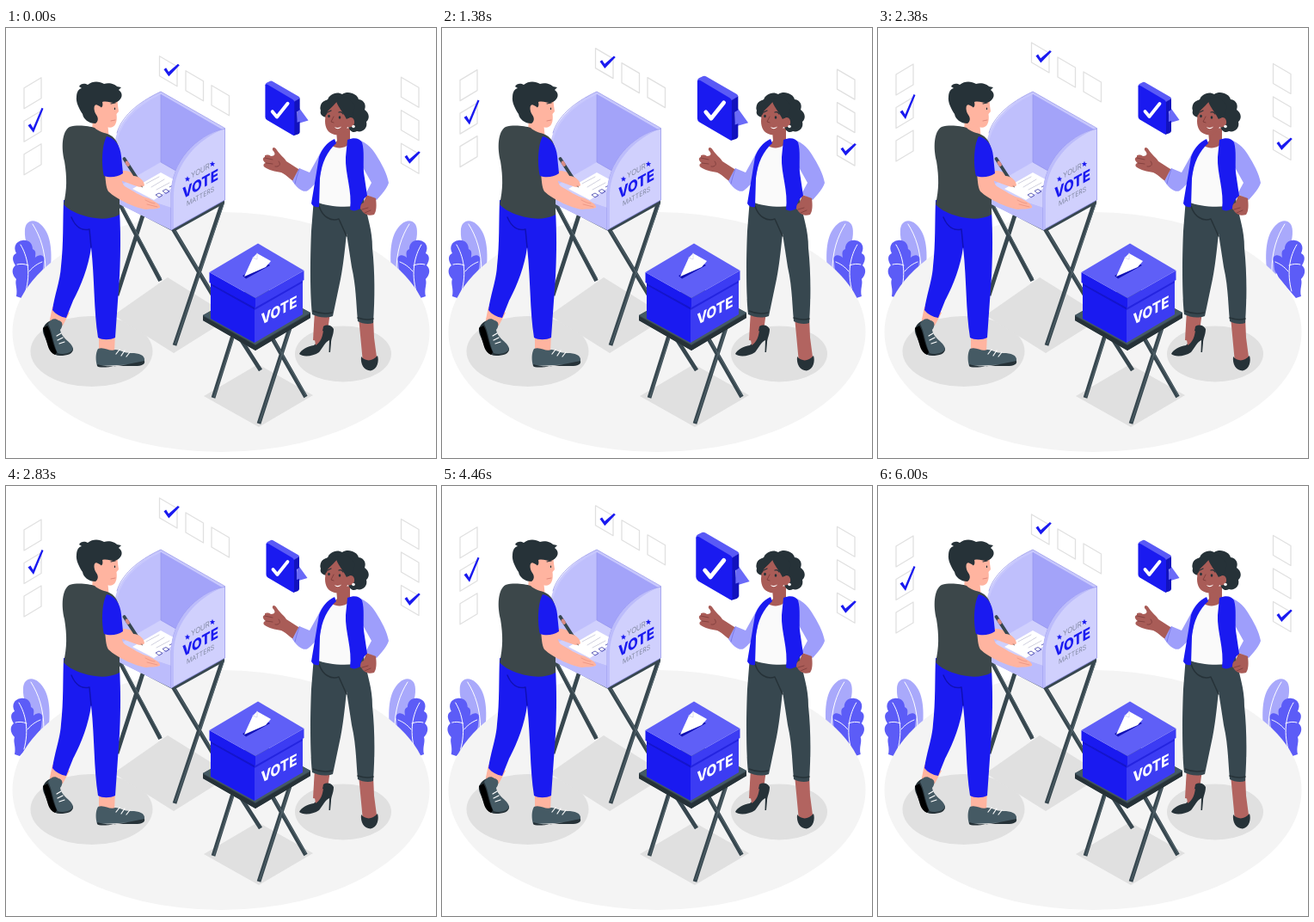
An HTML page that plays this animation: 500 by 500 pixels, repeating every 6040 ms.

```html
<!DOCTYPE html>
<html lang="en">
<head>
<meta charset="utf-8">
<title>Vote</title>
<style>
html, body { margin: 0; width: 100%; height: 100%; overflow: hidden; background: #fff; }
svg { display: block; width: 100vw; height: 100vh; }
text { font-family: Inter, "Open Sans", sans-serif; text-anchor: middle; }
.line { fill: none; stroke-linecap: round; stroke-linejoin: round; }
.blue { fill: #1a1af0; }
.slate { fill: #37474f; }
.ink { fill: #263238; }
.skin { fill: #ffb4a0; }
.tan { fill: #a95c57; }
.shin { fill: #b26460; }
.lilac { fill: #9e9efb; }
.box { fill: none; stroke: #e0e0e0; stroke-width: 1.3; stroke-linejoin: round; }
.tick { fill: #1a1af0; }
.leg { stroke: #37474f; stroke-width: 4.8; fill: none; }
.shine { stroke: #55666e; stroke-width: 1; fill: none; }
</style>
</head>
<body>
<svg viewBox="0 0 500 500">
<defs>
  <g id="plant">
    <path fill="#a9a9fb" d="M42 290C38 268 21 258 22 236C22 224 32 221 40 228C52 238 54 258 52 280Z"/>
    <path class="line" stroke="#fff" d="M31 228C40 242 46 260 46 282"/>
    <path fill="#5c5cf7" d="M12 312C14 303 10 298 12 292C7 287 6 280 11 276C7 270 7 264 12 262C8 254 12 248 19 247C26 246 31 250 31 257C36 259 34 264 34 267C39 262 46 264 44 271C43 277 44 282 40 286C38 292 34 296 30 300L18 314Z"/>
    <path class="line" stroke="#fff" d="M17 252C25 265 29 284 23 306M26 276C21 274 17 274 13 275M27 283C32 277 37 274 42 272"/>
  </g>
  <path id="star" d="M0-3.2L.9-1L3.2-.8L1.4.7L2 3L0 1.8L-2 3L-1.4.7L-3.2-.8L-.9-1Z"/>
  <path id="squareUp" class="box" d="M21 70L41 58V82L21 94Z"/>
  <path id="squareDown" class="box" d="M0 0L20.500 12V35L0 23Z"/>
  <path id="tick" class="tick" d="M0 6.500L2.600 4.600L5.600 9.200L16.400 0L18.300 1.500L5.800 14.500Z"/>
</defs>

<g id="plants">
  <use href="#plant"/>
  <use href="#plant" transform="matrix(-1 0 0 1 500 0)"/>
</g>

<ellipse cx="250" cy="353.500" rx="242.500" ry="139.500" fill="#f4f4f4"/>
<g fill="#e0e0e0">
  <ellipse cx="99.500" cy="376" rx="71" ry="41"/>
  <ellipse cx="392" cy="379" rx="56" ry="32.500"/>
  <path d="M125 334L188 290L262 336L195 378ZM230 428L293 391L357 427L294 464Z"/>
</g>

<g id="squares">
  <use href="#squareUp"/><use href="#squareUp" y="38.500"/><use href="#squareUp" y="77"/>
  <path class="tick" d="M25.500 113.500L28.500 111.500L31.500 116.500L41.500 93L43.500 94L32 122Z"/>
  <use href="#squareDown" x="178.500" y="33"/><use href="#squareDown" x="209" y="50"/><use href="#squareDown" x="239" y="67"/>
  <use href="#tick" x="183.500" y="42"/>
  <use href="#squareDown" x="459.500" y="57.500"/><use href="#squareDown" x="459.500" y="96"/><use href="#squareDown" x="459.500" y="134.500"/>
  <use href="#tick" x="463.500" y="143.500"/>
</g>

<!-- booth -->
<path class="leg" d="M161 212L129 311M132 204L179.500 294M195 235L240 310M252 202L196 369"/>
<path class="shine" d="M133 203L180.500 291M253 205L197 367M196 235L240 308"/>
<path class="slate" d="M128 202L195 237L254 204V199L195 232L128 196Z"/>
<path fill="#bfbffc" d="M180 75C148 90 126 112 126 150V202L192 234L195 190L180 156Z"/>
<path fill="#a3a3f9" d="M180 75L254 117V195L180 158Z"/>
<path fill="#d0d0fd" d="M126 187L180 156L226 183L192 209Z"/>
<path fill="#bcbcfc" d="M126 187L192 209V235L126 202Z"/>
<path class="line" stroke="#9595ee" stroke-width=".7" d="M180 77V156L226 182"/>
<path class="line" stroke="#c8c8fd" stroke-width="2.500" d="M127 140C128 112 150 90 180 75.500L253 117.500"/>
<path class="line" stroke="#8a8ae8" stroke-width=".7" d="M129 122C134 104 152 87 180 74L254.500 116.500"/>
<path fill="#fff" d="M147 187L180 168L202 180L172 200Z"/>
<path class="line" stroke="#c4c4d6" stroke-width=".8" d="M163 181L178 173M169 185L184 176M175 188L190 180"/>
<path fill="none" stroke="#3c3ca8" stroke-width=".8" d="M174 194L178 192L182 194.500L178 197ZM182 189.500L186 187.500L190 190L186 192.500ZM190 185L193 183.500L196 185.500"/>
<path fill="#d0d0fd" stroke="#8f8fe8" stroke-width=".7" d="M192 235V193C193 155 220 126 254.500 117V200Z"/>
<path fill="#bcbcfb" d="M192 235V193C193 155 220 126 254 117C222 130 196 158 195 194V233Z"/>
<g transform="matrix(.87 -.48 0 1 226 -3)">
  <text y="172" font-size="9" font-weight="300" fill="#6b7488">YOUR</text>
  <text y="190.500" font-size="17.500" font-weight="800" class="blue">VOTE</text>
  <text y="201.500" font-size="8" font-weight="300" fill="#6b7488">MATTERS</text>
</g>
<use href="#star" class="blue" x="211" y="175.500"/><use href="#star" class="blue" x="240" y="158"/>

<!-- voter -->
<g>
  <path class="skin" d="M133 166C140 166 146 166 149 171C155 173 161 178 161 183C157 187 153 184 149 183L133 177Z"/>
  <path class="line" stroke="#37474f" stroke-width="3.800" stroke-linecap="butt" d="M137.500 152L153 176"/>
  <path class="line" stroke="#d98c84" stroke-width="3.800" stroke-linecap="butt" d="M140.500 156.500L142 159"/>
  <path class="ink" d="M151.500 177L155 175L159 186Z"/>
  <path class="skin" d="M146 173C149 170 157 174 160 180L158 184L150 181Z"/>

  <path class="skin" d="M54 324L74 331L66 346L50 344Z"/>
  <path class="skin" d="M108 352L127 354L126 378L108 377Z"/>
  <path class="ink" d="M43 349C46 343 50 340 55 340L58 364C65 369 73 371 78 372C79 379 71 381 63 381C54 381 50 374 48 366C46 360 42 355 43 349Z"/>
  <path fill="#000" d="M43 349L48 346C53 353 53 365 59 377L57 380C50 377 49 370 47 364Z"/>
  <path fill="#455a64" d="M49 344C52 338 57 337 61 340C66 341 67 346 63 351C65 362 77 365 78 373C75 379 66 380 60 378C55 368 54 353 49 344Z"/>
  <path class="line" stroke="#fff" stroke-width="1.200" d="M59 358L64 355M60 363L66 360M62 367L68 365"/>
  <path fill="#455a64" d="M107 373C114 370 121 377 127 374C133 374 136 378 146 378C154 378 162 380 161 387L158 391L106 393C104 386 104 378 107 373Z"/>
  <path class="ink" d="M106 391C124 397 143 390 161 387C162 391 158 393 150 393H126C117 395 107 395 106 393Z"/>
  <path class="line" stroke="#fff" stroke-width="1.200" d="M128 379L132 374M134 381L138 375M140 382L144 377"/>

  <path class="blue" d="M67 200L132 212C134 245 133 285 130 317L127 360C121 363 112 363 107 360C102 328 103 291 99 255C96 278 87 300 78 317L70 337C64 336 58 333 54 328C56 312 63 294 64 277C67 251 66 225 67 200Z"/>
  <path class="line" stroke="#1010b4" stroke-width="1.500" d="M76 220C81 232 89 236 97 234L99 255"/>
  <path class="skin" d="M101 100L118 109L120 130L100 124Z"/>
  <path fill="#3c474a" d="M74 115C83 112 97 114 103 116C108 121 116 122 120 124C130 129 133 139 132 155L132 217C119 224 102 222 90 218C79 215 70 209 67 205C71 187 71 174 68 155C64 139 65 120 74 115Z"/>
  <path class="skin" d="M115 169L134 169C134 176 135 181 138 184C147 189 157 196 166 198C173 202 180 205 179 209C174 211 169 210 163 211C153 210 129 200 119 190C116 185 116 177 115 169Z"/>
  <path class="line" stroke="#ea9280" stroke-width=".8" d="M164 205L176 208M162 200C166 202 170 204 173 204"/>
  <path class="blue" d="M117 126C127 128 133 137 134 149L136 169C129 174 120 174 114 172C111 160 111 137 117 126Z"/>

  <path class="skin" d="M105 80L130 78C129 85 130 90 131 97L128.500 100C130 111 126 118 117 115C111 114 108 110 106 106L100 100Z"/>
  <path class="ink" d="M85 68C87 64 92 64 95 66C101 61 109 62 114 65C121 63 127 66 129 68L134 69L131 72C137 76 135 83 129 86C124 89 119 84 112 86C114 94 108 94 107 90C102 87 101 95 105 101C108 105 107 109 104 111C96 111 90 106 89 100C85 94 81 86 82 80C82 75 84 71 88 70Z"/>
  <path class="skin" d="M111 93C106 87 101 91 104 98C106 103 111 105 113 101Z"/>
  <path class="line" stroke="#263238" stroke-width="1.200" d="M122 88L127 87M126.500 93V94.500"/>
  <path class="line" stroke="#e08a7c" stroke-width="1" d="M122 108L127 107"/>
</g>

<!-- ballot box -->
<path class="leg" d="M265 354L241 430M273 362L296 398M308 358L348.500 429M331 346L294 460"/>
<path class="shine" d="M266 356L242 429M309 358L349 427M331 349L295 458"/>
<path class="slate" d="M229 334L293 298L354 331V337L290 375L229 340Z"/>
<path class="ink" d="M229 335L290 369L354 332V337L290 375L229 340Z"/>
<path fill="#455a64" d="M229 334L293 298L354 331L290 368Z"/>
<path class="blue" d="M238 292L289 320V366L238 338Z"/>
<path fill="#3c3cf3" d="M289 320L345 288V333L289 366Z"/>
<path fill="#1414cc" d="M238 297L289 325V327.500L238 299Z"/>
<path fill="#2424e0" d="M289 325L345 293V296L289 328Z"/>
<path class="blue" d="M236.500 284L290 314V325L236.500 296Z"/>
<path fill="#3c3cf3" d="M290 314L346.500 282V293L290 325Z"/>
<path fill="#5f5ff7" d="M236.500 284L293 250.500L346.500 282L290 314Z"/>
<path fill="#1111b4" d="M275 288L304 274L307 276L279 291.500Z"/>
<path fill="#fff" d="M277 289L287 267L292 262L308 271L302 278Z"/>
<path class="line" stroke="#d6d6ee" stroke-width=".8" d="M287 267L292 269V262"/>
<g transform="matrix(.87 -.46 0 1 317.500 329.500)">
  <text y="5" font-size="17.500" font-weight="800" fill="#fff">VOTE</text>
</g>

<!-- woman -->
<g>
  <path class="shin" d="M359 328L377 330L374 352L368 365L357 363Z"/>
  <path class="shin" d="M410 336L427 336L428 360L432 390L415 389Z"/>
  <path class="ink" d="M369 347C374 344 379 346 381 350C381 357 378 361 378 366L377 377H375.500L376 363C371 365 369 371 364 377C357 382 345 383 341 379C343 374 351 370 358 369C364 364 368 355 369 347Z"/>
  <path class="shin" d="M358 356L369 352C368 359 366 365 360 369Z"/>
  <path class="ink" d="M413 382C418 388 426 388 432 381C434 387 432 397 424 398.500C416 398 412 391 413 382Z"/>
  <path class="slate" d="M358 198H416C420 221 426 234 426 256C429 284 429 314 427 343C422 345 414 344 409 341C407 318 407 300 402 278L396 239C394 258 392 277 389 292L380 335C371 338 362 336 356 333C353 302 354 260 355 236Z"/>
  <path class="line" stroke="#263238" stroke-width="1.500" d="M364 207C368 220 378 225 387 222L396 242M357 329C364 332 371 333 379 331M409 337C415 339 421 340 427 338"/>

  <path class="tan" d="M342 184C332 178 328 172 320 168C313 167 305 165 301 162C298 160 300 157 302 157C298 154 298 151 301 150C300 147 305 147 308 149C313 149 314 146 310 142C309 138 313 138 315 142C318 147 324 151 326 155L340 164Z"/>
  <path class="line" stroke="#7c3b3a" stroke-width=".8" d="M302 157L310 158M301 151L310 153M313 161C318 162 320 158 317 155"/>
  <path class="lilac" d="M381 131C372 134 367 142 363 150L353 168L341 163C338 168 335 174 333 178C339 187 346 192 351 189C361 182 368 168 374 151Z"/>
  <path class="line" stroke="#7b7be8" stroke-width="1" d="M341 164C339 170 337 176 336 181"/>
  <path fill="#fafafa" d="M371 140L399 134L405 207C391 209 372 207 360 202Z"/>
  <path class="tan" d="M384 119L400 116V131C399 139 387 142 379 137L385 131Z"/>
  <path class="lilac" d="M406 129C417 131 425 139 430 147C437 158 443 169 445 180C443 187 437 193 431 200L418 193L425 180L411 155Z"/>
  <path class="tan" d="M419 194L430 198C431 206 431 213 428 217C422 219 416 217 413 211C409 209 412 205 416 203Z"/>
  <path class="line" stroke="#7c3b3a" stroke-width=".8" d="M414 211L421 209M417 215L424 212"/>
  <path class="blue" d="M382 129C373 133 367 141 364 150L355 204C357 208 361 209 364 208L365 175C367 156 374 143 384 134Z"/>
  <path class="blue" d="M397 130C405 127 411 128 414 133C417 143 415 156 416 168L420 195C416 198 412 204 412 210C407 213 403 213 400 211C403 190 394 169 395 150Z"/>

  <path class="ink" d="M366 96C364 88 369 84 374 84C375 77 385 73 391 77C398 72 409 77 410 83C417 84 419 90 417 95C423 99 423 106 419 109C421 117 414 122 408 120C403 123 399 119 398 114L373 104C366 103 365 99 366 96Z"/>
  <path class="tan" d="M372 95C374 88 381 84 388 85C391 94 395 100 398 105C402 102 406 106 405 111C403 116 399 116 397 115C395 122 389 125 382 124C374 122 371 116 371 108Z"/>
  <path class="ink" d="M383 82C385 91 391 96 396 106L403 102L406 90L396 80Z"/>
  <path class="ink" d="M366 96C364 86 376 80 387 82C384 88 378 92 374 97C373 104 367 104 366 96Z"/>
  <ellipse cx="375.500" cy="102.500" rx="1.300" ry="1.700" class="ink"/>
  <ellipse cx="388" cy="104" rx="1.300" ry="1.700" class="ink"/>
  <path class="line" stroke="#263238" stroke-width="1.200" d="M374 98L378 96M387 98C389 97 391 98 392 100"/>
  <path class="line" stroke="#7c3b3a" stroke-width=".9" d="M381 103L378 109L381 110"/>
  <path fill="#fff" d="M382 115C385 116.500 388 116 390 114.500C388 118 384 118 382 115Z"/>
  <circle cx="404" cy="114.500" r="1.800" fill="#fff"/>
</g>

<g id="bubble">
  <path fill="#6a6af8" d="M339 91L350.500 107L337 111Z"/>
  <path fill="#5a5af6" d="M302.500 68Q302.500 66 304 65L308 63Q309.500 62.500 311 63.500L339.500 80Q341 81 341 82L334 87Z"/>
  <path fill="#1212bd" d="M333 87L341 82V95L338 97V109L341 108V120Q340.500 121.500 339 122.300L334 124Z"/>
  <path class="blue" d="M302.500 68Q302.800 66 305 67L333 83.500Q335 84.500 335 87V122Q335 124.300 333 123.200L304.500 106.500Q302.500 105 302.500 103Z"/>
  <path class="line" stroke="#fff" stroke-width="3.800" d="M310.500 97L315.500 103L327.500 88"/>
</g>
</svg>
<script>
const LOOP = 6040, LEAD = 40;
const byId = id => document.getElementById(id);
const plants = byId("plants"), squares = byId("squares"), bubble = byId("bubble");

const FLOAT = [[0, 0], [.5, -20], [1, 0]];
const SHAKE = [[0, 0], [.1, -1], [.2, 2], [.3, -4], [.4, 4], [.5, -4], [.6, 4], [.7, -4], [.8, 2], [.9, -1], [1, 0]];
const BEAT = [[0, 1], [.1, 1.33], [.3, 1], [.4, 1], [.5, 1.33], [.6, 1], [1, 1]];

function sample(keys, p) {
  const i = keys.findIndex(([at]) => at > p);
  const [a, from] = keys[i - 1], [b, to] = keys[i];
  return from + (to - from) * (p - a) / (b - a);
}

function draw(ms) {
  const p = (ms + LEAD) / LOOP % 1;
  squares.setAttribute("transform", `translate(0 ${sample(FLOAT, p)})`);
  plants.setAttribute("transform", `translate(${sample(SHAKE, p)} 0)`);
  const s = sample(BEAT, p * 2 % 1);
  bubble.setAttribute("transform", `translate(326.600 93.500) scale(${s}) translate(-326.600 -93.500)`);
}

const start = performance.now();
function tick() {
  draw(performance.now() - start);
  requestAnimationFrame(tick);
}
tick();
</script>
</body>
</html>
```
